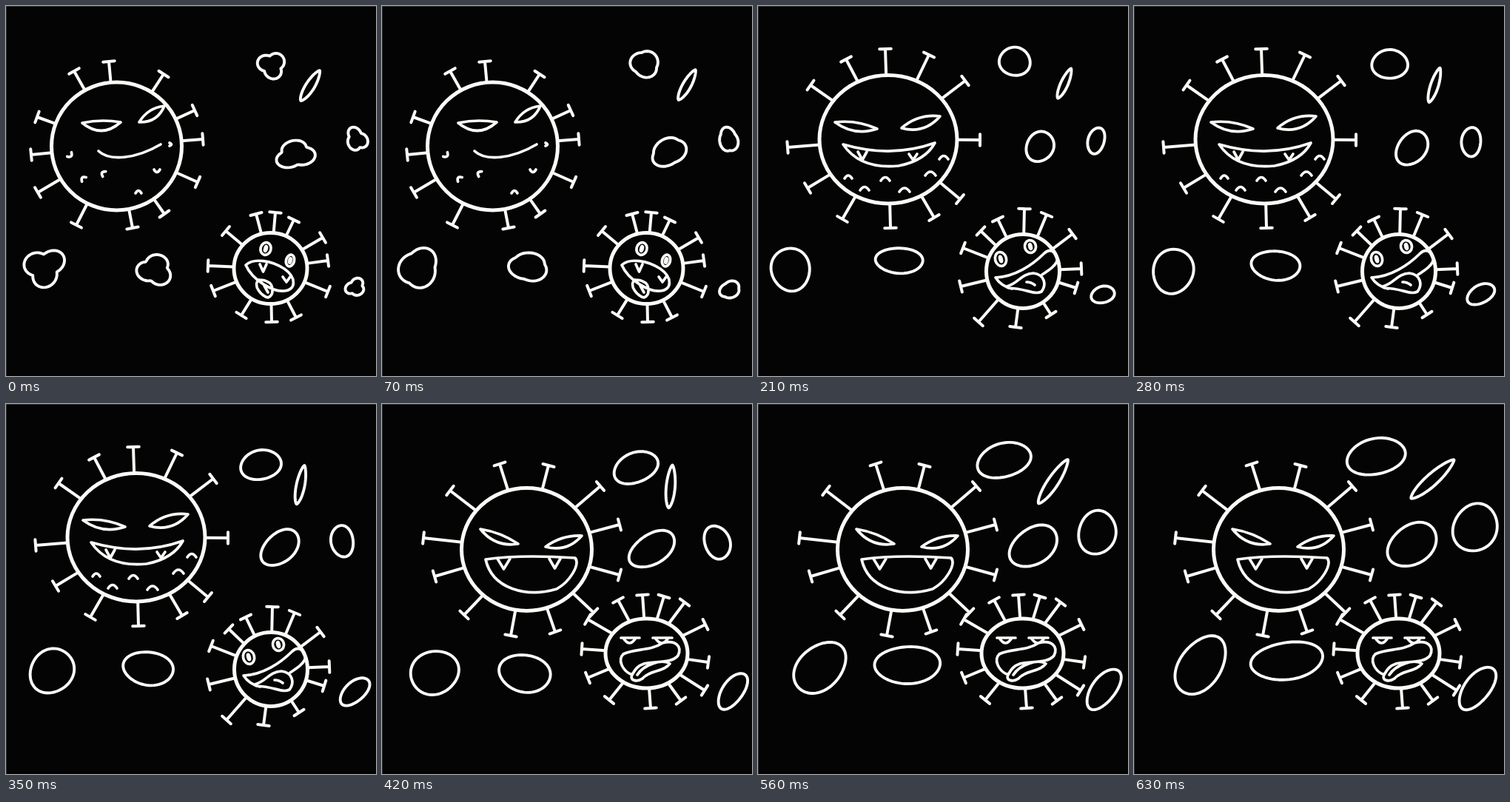
An HTML page with a canvas for the animation above (0.7 s loop, 500 by 500 pixels).

```html
<!DOCTYPE html>
<html lang="en">
<head>
<meta charset="utf-8">
<title>Viruses</title>
<style>
html, body { margin: 0; width: 100%; height: 100%; overflow: hidden; background: #040404; }
canvas { display: block; width: 100vmin; height: 100vmin; }
</style>
</head>
<body>
<canvas id="stage" width="500" height="500"></canvas>
<script>
const ctx = document.getElementById('stage').getContext('2d');
const STEP = 70, STEPS = 10, KEY_GAP = 3;
const INK = '#fcfbf8', PAPER = '#040404', EDGE = '#333';
const TAU = Math.PI * 2, RAD = Math.PI / 180;

// Face parts, each returned as path data
function lens(x1, y1, x2, y2, above, below) {
  const dx = x2 - x1, dy = y2 - y1, len = Math.hypot(dx, dy);
  const bend = h => `${(x1 + x2) / 2 - dy / len * h} ${(y1 + y2) / 2 + dx / len * h}`;
  return `M${x1} ${y1}Q${bend(above)} ${x2} ${y2}Q${bend(below)} ${x1} ${y1}Z`;
}

function arch(x, y, deg = 0, w = 4) {
  const c = Math.cos(deg * RAD), s = Math.sin(deg * RAD);
  const at = (u, v) => `${x + u * c - v * s} ${y + u * s + v * c}`;
  return `M${at(-w, 2)}Q${at(0, -w - 1)} ${at(w, 2)}`;
}

const oval = (x, y, rx, ry, tilt) => {
  const dx = ry * Math.sin(tilt * RAD), dy = -ry * Math.cos(tilt * RAD);
  const arc = `a${rx} ${ry} ${tilt} 0 1 `;
  return `M${x + dx} ${y + dy}${arc}${-2 * dx} ${-2 * dy}${arc}${2 * dx} ${2 * dy}Z`;
};
const eye = (x, y, rx, ry, tilt) => oval(x, y, rx, ry, tilt) + oval(x, y, 1.2, ry * 0.4, tilt);
const tooth = (x, y, w, h) => `M${x} ${y}l${w / 2} ${h}l${w / 2} ${-h}`;
const lid = (x, y, w) => `M${x} ${y}h${w}` + lens(x + 3, y, x + w - 5, y, 0, 14);

// ring: cx, cy, rx, ry; tips: x, y of each spike end
function virus(ring, tips, ...face) {
  return { ring, tips, face: new Path2D(face.join('')) };
}

const poses = [
  [
    virus([149.5, 189.5, 88, 86.5],
      [139, 75, 213, 92, 255, 141, 266, 180, 259, 238, 214, 281,
       171, 300, 95, 296, 43, 252, 34, 201, 42, 150, 92, 88],
      lens(103, 158, 155, 157, -5, 22), lens(180, 157, 214, 135, -10, 14),
      'M125 196C140 210 175 207 209 187',
      arch(87, 202, 135), arch(104, 233, -45), arch(131, 226, -60),
      arch(179, 251), arch(204, 223, 180), arch(223, 187, 90, 2)),
    virus([357.5, 354.5, 49.5, 48],
      [338, 281, 364, 279, 389, 289, 428, 313, 435, 344, 435, 386,
       392, 421, 359, 427, 318, 418, 280, 385, 273, 351, 297, 304],
      eye(351, 328, 7, 8.5, 15), eye(384, 344, 5.5, 8, 15),
      'M324 350C335 340 359 344 376 355C393 367 392 384 376 385C362 387 333 371 324 350Z',
      tooth(343, 349, 9, 10), tooth(374, 366, 10, 7),
      'M342 370C332 377 346 393 354 394C363 391 361 375 354 373C350 370 346 370 342 370M349 378L354 387')
  ],
  [
    virus([176, 180.3, 93, 86.7],
      [172, 58, 231, 66, 280, 101, 300, 181, 273, 261, 238, 286,
       179, 300, 114, 288, 67, 246, 40, 191, 71, 107, 119, 72],
      lens(104, 157, 161, 166, -8, 15), lens(194, 165, 246, 149, -12, 17),
      'M115 187Q180 206 239 185Q226 209 190 216Q138 221 115 187Z',
      tooth(135, 197, 12, 11), tooth(204, 200, 11, 8),
      arch(122, 231, 0, 5), arch(144, 247, 0, 6), arch(172, 234, 0, 6),
      arch(198, 249, 0, 7), arch(233, 227, 0, 7), arch(251, 205, 0, 6)),
    virus([358, 358.5, 49.5, 50],
      [324, 288, 360, 274, 390, 282, 425, 308, 437, 355, 430, 381,
       396, 417, 348, 434, 298, 427, 274, 379, 277, 327, 301, 304],
      eye(328, 342, 7.5, 9.5, -15), eye(368, 325, 7.5, 8.5, -15),
      'M321 367C347 366 371 350 387 334C397 325 406 336 404 345C401 352 393 357 384 363',
      'M321 367Q329 379 343 382',
      'M336 379C352 375 355 362 372 361C388 363 390 377 383 386C373 391 364 382 338 381M363 373Q369 373 374 377')
  ],
  [
    virus([195.5, 196.5, 88, 83],
      [159, 81, 225, 83, 295, 111, 321, 163, 321, 231, 286, 282,
       234, 308, 174, 313, 111, 285, 71, 233, 56, 181, 92, 117],
      lens(133, 169, 184, 189, -6, 16), lens(221, 193, 270, 178, -9, 16),
      'M140 210C180 204 230 206 261 208C268 217 254 240 236 250C195 262 149 250 140 210Z',
      tooth(156, 209, 17, 14), tooth(226, 209, 15, 13)),
    virus([357.5, 337, 55.5, 47],
      [319, 265, 352, 258, 381, 260, 409, 268, 437, 298, 441, 349, 436, 387,
       404, 401, 363, 411, 307, 400, 278, 370, 270, 331, 278, 291],
      lid(323, 316, 25), lid(366, 316, 26),
      'M338 366C325 361 318 346 326 338C342 330 363 334 379 323C397 318 406 328 400 340',
      'C391 351 369 347 354 351C344 354 341 361 338 366',
      'C334 374 345 376 352 371C361 360 381 362 389 351C378 344 354 352 345 366')
  ]
];

// Drifting cells: cx, cy, rx, ry, tilt at every third step
const cells = [
  [[359, 80, 18, 17, 20], [347, 75, 21, 19, 10], [343, 86, 31, 20, -22], [327, 71, 40, 24, -12]],
  [[411, 108, 24, 6, -58], [414, 105, 22, 5, -66], [390, 112, 29, 6, -85], [403, 102, 39, 8, -42]],
  [[391, 201, 26, 18, -10], [381, 190, 21, 18, -60], [365, 196, 34, 20, -32], [376, 190, 36, 26, -35]],
  [[474, 180, 16, 13, 60], [457, 182, 18, 11, -75], [453, 187, 23, 17, 70], [461, 167, 33, 29, -60]],
  [[52, 353, 27, 24, -30], [44, 356, 29, 26, 80], [71, 363, 33, 29, -20], [90, 353, 44, 28, -55]],
  [[201, 357, 23, 20, 10], [191, 344, 32, 17, 2], [193, 364, 35, 25, 10], [207, 347, 49, 25, -8]],
  [[472, 380, 13, 11, -30], [466, 390, 16, 11, -15], [474, 388, 28, 14, -55], [464, 384, 34, 17, -52]]
];

function drawVirus({ ring, tips, face }) {
  const [cx, cy, rx, ry] = ring;
  ctx.lineWidth = 5;
  ctx.beginPath();
  ctx.ellipse(cx, cy, rx, ry, 0, 0, TAU);
  ctx.stroke();

  ctx.lineWidth = 4;
  ctx.beginPath();
  for (let i = 0; i < tips.length; i += 2) {
    const x = tips[i], y = tips[i + 1], dx = x - cx, dy = y - cy;
    const reach = Math.hypot(dx / rx, dy / ry);
    const bar = 7.8 / Math.hypot(dx, dy);
    ctx.moveTo(cx + dx / reach, cy + dy / reach);
    ctx.lineTo(x, y);
    ctx.moveTo(x + dy * bar, y - dx * bar);
    ctx.lineTo(x - dy * bar, y + dx * bar);
  }
  ctx.stroke();

  ctx.lineWidth = 3.7;
  ctx.stroke(face);
}

function cellAt(keys, step) {
  const i = Math.min(Math.floor(step / KEY_GAP), keys.length - 2);
  const k = step / KEY_GAP - i;
  return keys[i].map((v, j) => {
    let d = keys[i + 1][j] - v;
    if (j === 4) d -= Math.round(d / 180) * 180; // shortest turn
    return v + d * k;
  });
}

// Three-lobed lump that smooths out into an oval; thin cells get pointed ends
function drawCell([cx, cy, rx, ry, tilt], lump, seed) {
  const thin = rx > ry * 2.8;
  const c = Math.cos(tilt * RAD), s = Math.sin(tilt * RAD);
  ctx.beginPath();
  for (let t = 0; t < TAU; t += TAU / 60) {
    const lobes = thin ? 0 : lump * (Math.abs(Math.sin(1.5 * t + seed)) - 0.75);
    const k = 1 + lobes + 0.02 * Math.sin(3 * t + seed);
    const sin = Math.sin(t);
    const x = rx * k * Math.cos(t);
    const y = ry * k * sin * (thin ? Math.abs(sin) ** 0.4 : 1);
    ctx.lineTo(cx + x * c - y * s, cy + x * s + y * c);
  }
  ctx.closePath();
  ctx.stroke();
}

function draw(ms) {
  const step = Math.floor(ms / STEP) % STEPS;
  ctx.fillStyle = PAPER;
  ctx.fillRect(0, 0, 500, 500);
  ctx.fillStyle = EDGE;
  ctx.fillRect(0, 0, 500, 1);
  ctx.fillRect(0, 0, 1, 500);
  ctx.strokeStyle = INK;
  ctx.lineCap = ctx.lineJoin = 'round';
  poses[Math.min(Math.floor(step / 3), 2)].forEach(drawVirus);
  ctx.lineWidth = 3.9;
  const lump = Math.max(0, 0.36 - 0.2 * step);
  cells.forEach((keys, i) => drawCell(cellAt(keys, step), lump, i * 2));
}

let start;
function tick(now) {
  if (start === undefined) start = now;
  draw(now - start);
  requestAnimationFrame(tick);
}
draw(0);
requestAnimationFrame(tick);
</script>
</body>
</html>
```
